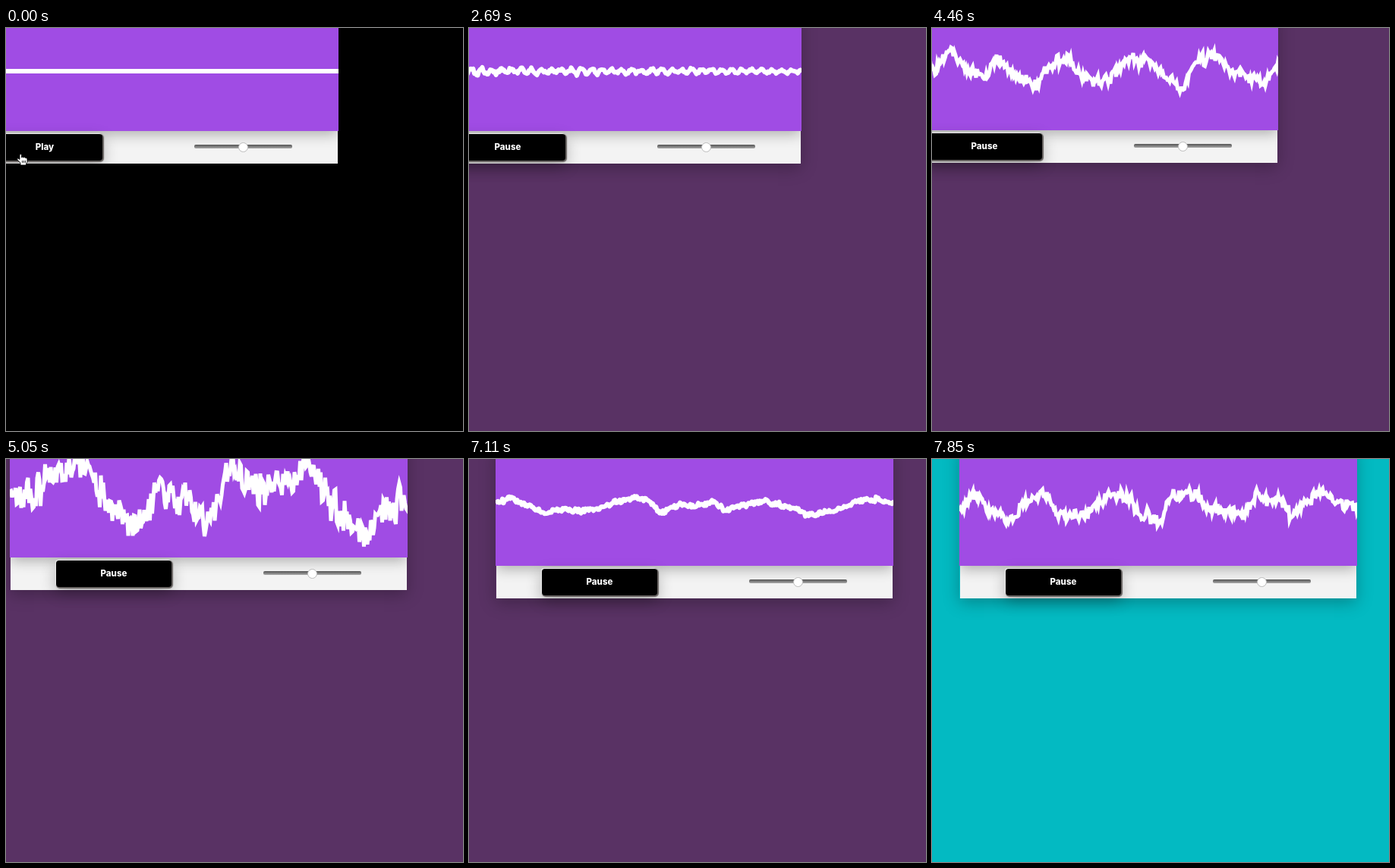
Animation of 602 by 532 pixels, one loop 8 s. Source, as an HTML page with a canvas:

```html
<!DOCTYPE html>
<html lang="en">
<head>
<meta charset="utf-8">
<title>Audio visualiser</title>
<style>
  html, body { margin: 0; width: 100%; height: 100%; overflow: hidden; background: #000; }
  #panel {
    position: absolute; left: 0; top: -201px; width: 523px; height: 201px;
    box-shadow: 0 6px 20px rgba(0, 0, 0, .27);
  }
  #bar { position: absolute; left: 1px; top: 158px; width: 522px; height: 43px; background: #f3f3f3; overflow: hidden; }
  #bar::before {
    content: ""; position: absolute; top: -40px; width: 100%; height: 40px;
    box-shadow: 0 4px 18px rgba(0, 0, 0, .3);
  }
  #wave { position: absolute; left: 0; top: 0; background: #a04ce4; }
  #button {
    position: absolute; left: 61px; top: 162px; width: 152px; height: 35px;
    border-radius: 4px; background: #000; color: #fff; text-align: center;
    font: 800 11.5px/35px Inter, Roboto, sans-serif;
    box-shadow: -1px -1px 1px #eee, 1px 1px 1px 1px #65615f, 0 7px 20px rgba(0, 0, 0, .3);
  }
  #button.pressed {
    box-shadow: 0 -2px 1px #777, 1px 2px 1px #fff, 0 3px 14px rgba(0, 0, 0, .22);
  }
  #track {
    position: absolute; left: 334px; top: 176px; width: 129px; height: 5px;
    border-radius: 2px; background: linear-gradient(#555, #777 45%, #aaa);
  }
  #thumb {
    position: absolute; left: 392px; top: 173px; width: 11px; height: 11px;
    border: 1px solid #bbb; border-radius: 50%; background: #fff;
  }
  svg { position: absolute; left: 0; top: 0; }
</style>
</head>
<body>
<div id="panel">
  <div id="bar"></div>
  <canvas id="wave" width="524" height="158"></canvas>
  <div id="button">Play</div>
  <div id="track"></div>
  <div id="thumb"></div>
</div>
<svg width="602" height="532">
  <path id="hand" fill="#fff" stroke="#000" stroke-width=".8" stroke-linejoin="round"
    d="M19 181V178L15 174Q14 172 16 172L18 173.5V167.5Q19 165.5 20.5 167.5V171Q22 169.5 23 171Q25 170 25.5 171.5Q28 171 28 173V177L26.5 179V181ZM21.5 175V178M23.5 175V178M25.5 175V178"/>
  <path id="arrow" stroke="#fff" stroke-linejoin="round"
    d="M81.5 6.5V21.5L85 18.5L87.5 24.5L90 23.5L87.5 17.5H92Z"/>
</svg>
<script>
const LOOP = 8000, PRESS = 2090, STEP = 147.7;
const W = 524, MID = 79, GAP = 1.5;
const $ = id => document.getElementById(id);
const ctx = $("wave").getContext("2d");

// Which sound is heard at each step: flat, attack, hum, loud, soft, medium
const SOUNDS = "0011111122222233545333554433554454445555";

// Slow contours, evenly spaced over the width, with sample noise on top
const CONTOURS = {
  3: { key: 20, noise: 28, y: [-1, -11, -36, -41, 9, 45, -6, 2, 30, -46, -6, -21, -41, 9, 48, 25, 0] },
  4: { key: 34, noise: 4, y: [-5, -10, 0, 9, 4, 7, 4, -3, -11, -10, 8, -1, 0, -5, 5, -1, -6, -3, 3, 12, 8, 2, -7, -9, -4] },
  5: { key: 39, noise: 11, y: [6, -14, 6, 20, -4, -17, 11, 16, 6, -14, -14, 10, 20, -14, -17, 0, 10, 13, -14, -7, 10, -4, -22, -4, 6] }
};

// Step, left edge, bottom edge
const PATH = [[0, -86, 179], [15, -86, 179], [20, 5, 173], [23, 17, 185], [31, 31, 184], [34, 35, 184], [39, 36, 184]];

const mix = (a, b, p) => a + (b - a) * p;
const rand = n => {
  const v = Math.sin(n * 127.1 + 11.7) * 43758.5453;
  return (v - Math.floor(v)) * 2 - 1;
};

function place(k) {
  let i = 1;
  while (i < PATH.length - 1 && PATH[i][0] < k) i++;
  const a = PATH[i - 1], b = PATH[i];
  const p = Math.max(0, (k - a[0]) / (b[0] - a[0]));
  return [1, 2].map(n => Math.round(mix(a[n], b[n], p)));
}

function contour(ys, x) {
  const pos = x / W * (ys.length - 1);
  const i = Math.min(Math.floor(pos), ys.length - 2), p = pos - i;
  return mix(ys[i], ys[i + 1], p * p * (3 - 2 * p));
}

function level(sound, k, x) {
  // Fine hiss plus coarser steps
  const grain = rand(x + k * 3.7) * .6 + rand(Math.floor(x / 5) + k * 5.3) * .4;
  if (sound == 0) return 0;
  if (sound == 1) {
    const size = mix(5.5, 2.6, x / W);
    return size * (Math.sin(x / 2.1 + (k - 4) * 2) * .7 + grain * .7);
  }
  if (sound == 2) {
    const phase = (k - 12) * 40;
    return -4.5 * Math.cos((x - 188 + phase) / 147 * 2 * Math.PI) + 2.8 * Math.sin(x / 1.7) + grain * 1.4;
  }
  const c = CONTOURS[sound];
  const shift = ((k - c.key) * 97 % W + W) % W;
  return contour(c.y, (x + shift) % W) + c.noise * grain;
}

function drawWave(k) {
  const sound = k < 0 ? 0 : +SOUNDS[k];
  ctx.clearRect(0, 0, W, 158);
  ctx.beginPath();
  for (let x = 0; x <= W + GAP; x += GAP) ctx.lineTo(x, MID + level(sound, k, Math.min(x, W - .01)));
  ctx.lineWidth = sound == 3 || sound == 5 ? 5 : 6;
  ctx.lineJoin = sound == 3 || sound == 5 ? "miter" : "round";
  ctx.miterLimit = 5;
  ctx.strokeStyle = "#fff";
  ctx.stroke();
}

let last;
function draw(now) {
  const t = now % LOOP;
  const k = t < PRESS ? -1 : Math.min(39, Math.floor((t - PRESS + 8) / STEP));
  const [x, y] = place(k);
  $("panel").style.transform = `translate(${x}px, ${y}px)`;
  document.body.style.background = k < 2 ? "#000" : k < 37 ? "#593264" : "#03bac2";
  $("button").className = k == 0 || k == 1 ? "pressed" : "";
  $("button").textContent = k < 2 ? "Play" : "Pause";
  $("hand").style.display = t < 150 ? "" : "none";
  $("arrow").style.display = k >= 11 && k <= 13 ? "" : "none";
  if (k !== last) drawWave(last = k);
}

const start = performance.now();
function tick() {
  draw(performance.now() - start);
  requestAnimationFrame(tick);
}
tick();
</script>
</body>
</html>
```
